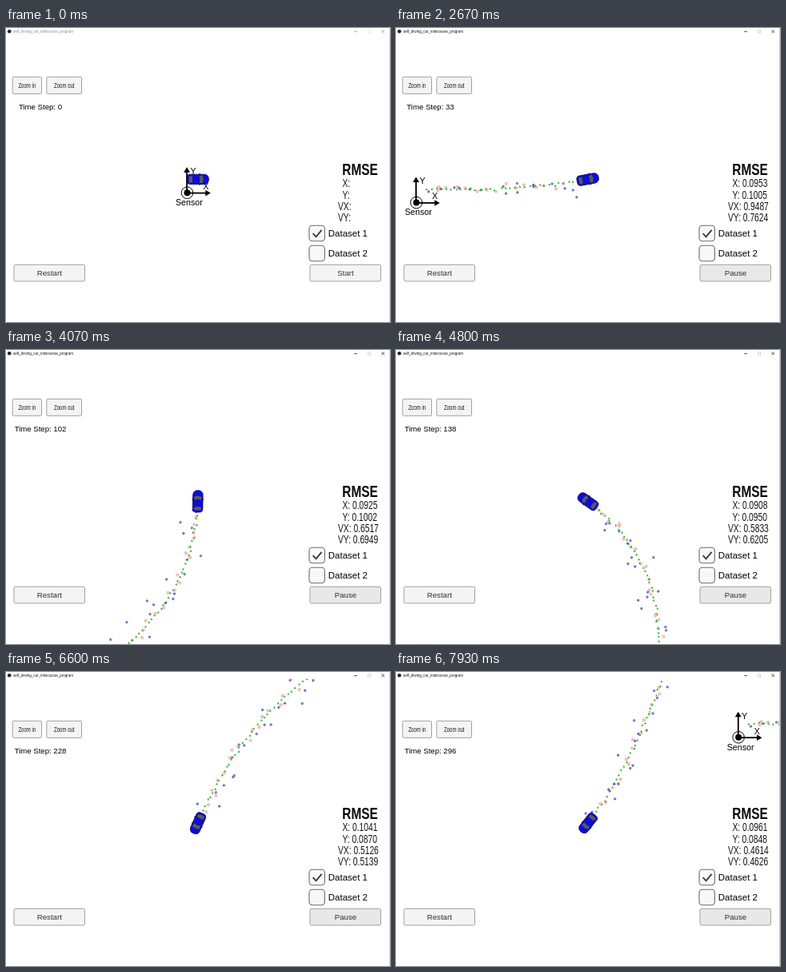
These frames come from a looping animation (480 by 368 pixels, 8 s). An HTML page with a canvas:

```html
<!DOCTYPE html>
<html lang="en">
<head>
<meta charset="utf-8">
<title>Tracking simulator</title>
<style>
  html, body { margin: 0; width: 480px; height: 368px; overflow: hidden; background: #fff; }
  canvas, svg { position: absolute; left: 0; top: 0; width: 480px; height: 368px; display: block; }
  text { font-family: "Liberation Sans", Arial, sans-serif; fill: #000; }
  .mid { text-anchor: middle; }
  .btn rect { fill: #f4f4f4; stroke: #a0a0a0; stroke-width: 1; }
  .btn text { fill: #323232; text-anchor: middle; font-size: 9.7px; }
  .btn .small { font-size: 8.4px; fill: #1c1c1c; }
  .check { fill: #f8f8f8; stroke: #6c6c6c; stroke-width: 1.1; }
  .bar { color: #111; }
  .bar.idle { color: #8c8c8c; }
  .bar text { fill: currentColor; font-size: 4.5px; }
  .bar path { stroke: currentColor; fill: none; stroke-width: .7; }
  .rmse text { font-size: 13.8px; fill: #161616; }
  .rmse .head { font-size: 20.6px; font-weight: bold; fill: #080808; }
</style>
</head>
<body>
<canvas id="world"></canvas>
<svg viewBox="0 0 480 368">
  <g class="bar idle" id="bar">
    <circle cx="4.2" cy="4.3" r="2.3" fill="#222"/>
    <text x="9" y="6">self_driving_car_minicourse_program</text>
    <path d="M435 4.6h4M469.4 2.6l3.6 3.6m0-3.6l-3.6 3.6"/>
    <path d="M452.5 2.7h3v3.4h-3z" opacity=".25"/>
  </g>
  <path d="M479.5 0V368" stroke="#d2d2d2"/>

  <g class="btn">
    <rect x="8.2" y="61.3" width="36.3" height="21" rx="1.5"/>
    <text class="small" transform="translate(26.3 74.8) scale(.72 1)">Zoom in</text>
    <rect x="50.8" y="61.3" width="43.7" height="21" rx="1.5"/>
    <text class="small" transform="translate(72.8 74.8) scale(.72 1)">Zoom out</text>
    <rect x="10" y="296.3" width="88.5" height="20.7" rx="2"/>
    <text x="54.3" y="310.2">Restart</text>
    <rect id="runBox" x="380" y="296.3" width="88.5" height="20.7" rx="2"/>
    <text id="run" x="424.5" y="310.2">Start</text>
  </g>

  <text id="step" class="mid" x="43" y="102.4" font-size="9.6"></text>

  <g class="rmse">
    <text class="head" transform="translate(420.3 184) scale(.75 1)">RMSE</text>
    <text class="value" transform="translate(420.5 199) scale(.745 1)"></text>
    <text class="value" transform="translate(420.5 213.5) scale(.745 1)"></text>
    <text class="value" transform="translate(415 228) scale(.745 1)"></text>
    <text class="value" transform="translate(415 241.6) scale(.745 1)"></text>
  </g>

  <rect class="check" x="379" y="247.3" width="19.4" height="19.4" rx="4"/>
  <path d="M383.6 257.2l4 4.2 7-8.6" fill="none" stroke="#3c3c3c" stroke-width="1.9"/>
  <rect class="check" x="379" y="272.3" width="19.4" height="19.4" rx="4"/>
  <text x="402.8" y="260.8" font-size="11.5">Dataset 1</text>
  <text x="402.8" y="285.8" font-size="11.5">Dataset 2</text>
</svg>
<script>
const LOOP = 8000, FPS = 15, START = 30;
const CX = 239.8, CY = 189.4;       // the camera keeps the car here
const TURN = 2.192, RATE = 0.0125, LAST = 300;
const SENSOR = { x: -13.3, y: 16.8 };

const $ = id => document.getElementById(id);
const canvas = $("world"), ctx = canvas.getContext("2d");
const dpr = window.devicePixelRatio || 1;
canvas.width = 480 * dpr;
canvas.height = 368 * dpr;

// key points: time in ms, time step, errors of x, y, vx, vy
const keys = [
  [2000, 0, .12, .12, 4.2, .9],
  [3333, 66, .0938, .0993, .7551, .7542],
  [4067, 102, .0925, .1002, .6517, .6949],
  [5600, 178, .0896, .0911, .5330, .5659],
  [6600, 228, .1041, .0870, .5126, .5139],
  [7933, 296, .0961, .0848, .4614, .4626]
];
const names = ["X:", "Y:", "VX:", "VY:"];
const labels = document.querySelectorAll(".value");

let seed = 7;
function random() {
  seed = (seed * 16807) % 2147483647;
  return seed / 2147483647;
}
const gauss = () => Math.sqrt(-2 * Math.log(random())) * Math.cos(2 * Math.PI * random());
const yawAt = step => TURN * (1 - Math.cos(RATE * step));
const speedAt = step => RATE * (473 + 18 * Math.cos(2 * RATE * step));
const mix = (a, b, k) => a + (b - a) * k;

const path = [{ x: 0, y: 0 }];
for (let i = 0; i < LAST; i++) {
  const yaw = yawAt(i + .5), d = speedAt(i + .5);
  path.push({ x: path[i].x + d * Math.cos(yaw), y: path[i].y - d * Math.sin(yaw) });
}

// laser noise is even, radar noise grows with the distance from the sensor
const near = (p, s) => ({ x: p.x + gauss() * s, y: p.y + gauss() * s });
function radarHit(p) {
  const dx = p.x - SENSOR.x, dy = p.y - SENSOR.y;
  const dist = Math.hypot(dx, dy) + gauss() * 7;
  const angle = Math.atan2(dy, dx) + gauss() * .03;
  return { x: SENSOR.x + dist * Math.cos(angle), y: SENSOR.y + dist * Math.sin(angle) };
}
const trail = path.map((p, i) => ({
  radar: i % 2 === 1,
  hit: i % 2 ? radarHit(p) : near(p, 3.4),
  guess: near(p, .8)
}));

// values of the key row at `value` in column `col`
function between(col, value) {
  let i = 1;
  while (i < keys.length - 1 && value > keys[i][col]) i++;
  return [keys[i - 1], keys[i]];
}

function stepAt(time) {
  const [a, b] = between(0, time);
  const k = Math.max(0, (time - a[0]) / (b[0] - a[0]));
  return Math.round(mix(a[1], b[1], k));
}

function errorAt(step, col) {
  const [a, b] = between(1, step);
  const q = n => 1 / Math.sqrt(n + 1);
  return mix(a[col], b[col], (q(step) - q(a[1])) / (q(b[1]) - q(a[1])));
}

function dot(x, y, r) {
  ctx.beginPath();
  ctx.arc(x, y, r, 0, 7);
}

function poly(...p) {
  ctx.beginPath();
  for (let i = 0; i < p.length; i += 2) ctx.lineTo(p[i], p[i + 1]);
  ctx.closePath();
  ctx.fill();
}

function drawMarks({ radar, hit, guess }) {
  ctx.strokeStyle = radar ? "#3838c4" : "#e46464";
  ctx.lineWidth = radar ? .9 : .75;
  dot(hit.x, hit.y, radar ? 1.15 : 1.4);
  ctx.stroke();
  if (radar) {
    ctx.fillStyle = "#3838c4";
    ctx.fillRect(hit.x - 1, hit.y - .2, 1.2, .9);
  }
  ctx.fillStyle = "#26b326";
  poly(guess.x, guess.y - 1.5, guess.x + 1.5, guess.y + 1.2, guess.x - 1.5, guess.y + 1.2);
}

function drawCar(yaw) {
  ctx.save();
  ctx.translate(CX, CY);
  ctx.rotate(-yaw);
  ctx.fillStyle = "#10103c";
  ctx.fillRect(1.5, -7.2, 1.6, 14.4);
  ctx.beginPath();
  ctx.roundRect(-13.6, -6.2, 27.2, 12.4, [4, 5.5, 5.5, 4]);
  ctx.fillStyle = "#0c0cdc";
  ctx.fill();
  ctx.strokeStyle = "#08087c";
  ctx.lineWidth = .9;
  ctx.stroke();
  ctx.fillStyle = "#20205a";
  ctx.fillRect(-8, -5.3, 12, 1.1);
  ctx.fillRect(-8, 4.2, 12, 1.1);
  ctx.fillStyle = "#5c5c50";
  poly(1.8, -3.8, 5.8, -5, 7, 0, 5.8, 5, 1.8, 3.8, 2.6, 0);
  poly(-6.8, -3.6, -10.6, -4.5, -11.4, 0, -10.6, 4.5, -6.8, 3.6);
  ctx.restore();
}

function drawSensor(x, y) {
  ctx.save();
  ctx.translate(x, y);
  ctx.fillStyle = ctx.strokeStyle = "#000";
  ctx.lineWidth = 1;
  dot(0, 0, 7.3);
  ctx.stroke();
  dot(0, 0, 4);
  ctx.fill();
  ctx.fillRect(-1.3, -27, 1.8, 27);
  ctx.fillRect(0, -.5, 24, 1.8);
  poly(-.4, -32, 3.6, -25.5, -4.4, -25.5);
  poly(29.3, .4, 22.8, -3.4, 22.8, 4.2);
  ctx.textAlign = "center";
  ctx.font = '10.7px "Liberation Sans", Arial, sans-serif';
  ctx.fillText("Y", 7.5, -23.2);
  ctx.fillText("X", 23.2, -4.2);
  ctx.fillText("Sensor", 2.4, 15.9);
  ctx.restore();
}

function draw(frame) {
  const step = stepAt(frame * 1000 / FPS);
  const ox = CX - path[step].x, oy = CY - path[step].y;

  ctx.setTransform(dpr, 0, 0, dpr, 0, 0);
  ctx.clearRect(0, 0, 480, 368);
  ctx.save();
  ctx.beginPath();
  ctx.rect(0, 8.5, 479, 360);
  ctx.clip();
  ctx.save();
  ctx.translate(ox, oy);
  trail.slice(0, step).forEach(drawMarks);
  ctx.restore();
  drawCar(yawAt(step));
  drawSensor(ox + SENSOR.x, oy + SENSOR.y);
  ctx.restore();

  $("bar").classList.toggle("idle", frame < START);
  $("step").textContent = "Time Step: " + step;
  $("run").textContent = frame > START ? "Pause" : "Start";
  $("runBox").style.fill = frame < START ? "#f4f4f4" : frame === START ? "#d6d6d6" : "#e8e8e8";
  labels.forEach((label, i) => {
    label.textContent = names[i] + (step ? " " + errorAt(step, i + 2).toFixed(4) : "");
  });
}

let shown = -1;
function tick() {
  const time = performance.now() % LOOP;
  const frame = Math.min(119, Math.floor((time + 3.4) * FPS / 1000));
  if (frame !== shown) draw(shown = frame);
  requestAnimationFrame(tick);
}
tick();
</script>
</body>
</html>
```
